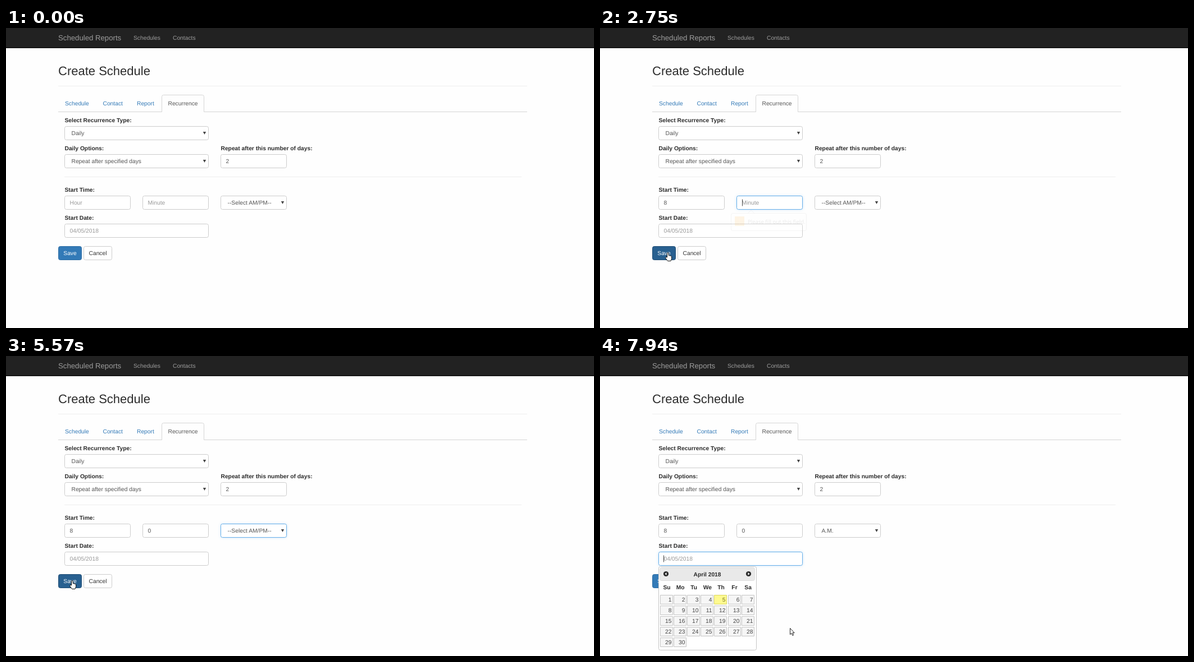
Write an HTML page with a canvas that moves like this. It is 1047x535 px and loops after 8000 ms.

```html
<!DOCTYPE html>
<html lang="en">
<head>
<meta charset="utf-8">
<title>Create Schedule</title>
<style>
html, body { margin: 0; width: 100%; height: 100%; overflow: hidden; background: #fefefe; }
canvas { display: block; }
</style>
</head>
<body>
<canvas id="stage" width="1047" height="535"></canvas>
<script>
const ctx = document.getElementById('stage').getContext('2d');
ctx.textRendering = 'geometricPrecision';
const LOOP = 8000, SIZE = 10.27, FIELD_H = 25;
const SANS = '"Liberation Sans", Arial, sans-serif';
const BUBBLE_FONT = '"Open Sans", "Noto Sans", sans-serif';

// The form grid: three columns, one y per row of fields
const COL = [104, 243, 382], WIDE = 257, NARROW = 118;
const TYPE_Y = 175, DAILY_Y = 225, TIME_Y = 299, DATE_Y = 349, BUTTON_Y = 389;

const ramp = (t, from, to) => Math.min(1, Math.max(0, (t - from) / (to - from)));
const ease = u => u * u * (3 - 2 * u);
const during = (t, from, to) => t >= from && t < to;
const over = (p, x, y, w) => p && p.x >= x && p.x <= x + w && p.y >= y && p.y <= y + FIELD_H;

// Each move curves from the last place to (x, y); bend pushes the arc sideways
const move = (from, to, x, y, bend = 0) => ({ from, to, x, y, bend });
const MOVES = [
  move(310, 920, 186, 321),
  move(1470, 1630, 207, 337),
  move(1630, 2070, 136, 402, .8),
  move(2220, 2250, 121, 401),
  move(3310, 4100, 401, 310, .15),
  move(4330, 4590, 507, 327),
  move(4780, 4930, 83, 454),
  move(4930, 5350, 118, 401, .5),
  move(5630, 6120, 457, 339, -.7),
  move(6200, 6420, 457, 318),
  move(6850, 7040, 465, 326),
  move(7040, 7170, 464, 344),
  move(7670, 7790, 340, 366),
  move(7790, 7930, 338, 485)
];

function pointerAt(t) {
  if (t < MOVES[0].from) return null;
  let x = 239, y = 500;
  for (const m of MOVES) {
    if (t < m.from) break;
    const u = ease(ramp(t, m.from, m.to)), dx = m.x - x, dy = m.y - y;
    const bow = 2 * u * (1 - u) * m.bend;
    x += dx * u + dy * bow;
    y += dy * u - dx * bow;
  }
  return { x: Math.round(x), y: Math.round(y) };
}

// y is the middle of the capitals
function text(str, x, y, color = '#555', { size = SIZE, weight = '', align = 'left', font = SANS } = {}) {
  ctx.font = `${weight} ${size}px ${font}`;
  ctx.textAlign = align;
  ctx.fillStyle = color;
  ctx.fillText(str, x, Math.round(y + size * 0.36));
}
const bold = (str, x, y, align) => text(str, x, y, '#2b2b2b', { weight: 'bold', align });
const label = (str, x, fieldY) => bold(str, x + .5, fieldY - 10.8);

function rect(x, y, w, h, color) {
  ctx.fillStyle = color;
  ctx.fillRect(x, y, w, h);
}

function box(x, y, w, h, fill, stroke, radius = 3) {
  ctx.beginPath();
  ctx.roundRect(x + .5, y + .5, w - 1, h - 1, radius);
  ctx.fillStyle = fill;
  ctx.fill();
  ctx.shadowColor = 'transparent';
  ctx.strokeStyle = stroke;
  ctx.lineWidth = 1;
  ctx.stroke();
}

function polygon(points, fill, stroke) {
  ctx.beginPath();
  points.forEach(([x, y]) => ctx.lineTo(x, y));
  ctx.closePath();
  ctx.fillStyle = fill;
  ctx.fill();
  if (stroke) { ctx.strokeStyle = stroke; ctx.lineWidth = 1; ctx.stroke(); }
}

function field(x, y, w, focused) {
  ctx.save();
  if (focused) {
    ctx.shadowColor = 'rgba(102,175,233,.4)';
    ctx.shadowBlur = 5;
  }
  box(x, y, w, FIELD_H, '#fff', focused ? '#66afe9' : '#ccc');
  ctx.restore();
}

function input(x, y, w, value, hint, focused) {
  field(x, y, w, focused);
  text(value || hint, x + 9.5, y + 12.5, value ? '#555' : '#999');
}

function select(x, y, w, value, focused) {
  field(x, y, w, focused);
  text(value, x + 12.5, y + 12.5);
  const ax = x + w - 7.5, ay = y + 10;
  polygon([[ax - 2.7, ay], [ax + 2.7, ay], [ax, ay + 5]], '#444');
}

function caret(t, since, x, y) {
  if ((t - since) % 1000 < 500) rect(x, y + 6.5, 1, 12, '#444');
}

function button(name, x, w, fill, stroke, color) {
  box(x, BUTTON_Y, w, FIELD_H, fill, stroke);
  text(name, x + w / 2, BUTTON_Y + 12.5, color, { align: 'center' });
}

function bubble(message, x, w, alpha) {
  if (alpha <= 0) return;
  ctx.save();
  ctx.globalAlpha = alpha;
  // The shadow shows through a half-clear box, so it fades in later
  ctx.shadowColor = `rgba(0,0,0,${.4 * alpha * alpha})`;
  ctx.shadowBlur = 4;
  ctx.shadowOffsetX = ctx.shadowOffsetY = 2;
  box(x, 330, w, 32, '#fff', '#999');
  polygon([[x + 30.5, 331], [x + 36, 324.5], [x + 41.5, 331]], '#fff');
  ctx.beginPath();
  ctx.moveTo(x + 30.5, 330.5);
  ctx.lineTo(x + 36, 324.5);
  ctx.lineTo(x + 41.5, 330.5);
  ctx.stroke();
  rect(x + 7, 336, 17, 17, '#ff9c0a');
  rect(x + 14.5, 339, 2, 7, '#fff');
  rect(x + 14.5, 348, 2, 2, '#fff');
  text(message, x + 30, 346, '#333', { size: 9.6, font: BUBBLE_FONT });
  ctx.restore();
}

function options(pointer) {
  const x = COL[2], y = TIME_Y + FIELD_H, step = 13.3;
  box(x, y - 1, NARROW, 42, '#fff', '#6f9bd8', 0);
  const active = pointer.y >= y + step ? 1 : 0;
  ['--Select AM/PM--', 'A.M.', 'P.M'].forEach((name, i) => {
    const top = y + i * step;
    if (i === active) rect(x + 1, Math.round(top), NARROW - 2, 14, '#1e90ff');
    text(name, x + 12.5, top + 6.5, i === active ? '#fff' : '#555');
  });
}

function calendar() {
  const left = 107, pitch = 24.1;
  box(104, 375, 175, 150, '#fff', '#c5c5c5');
  box(106, 377, 170, 24, '#e9e9e9', '#ddd');
  bold('April 2018', 191, 389, 'center');
  for (const [x, dir] of [[117.5, -1], [264.5, 1]]) {
    ctx.beginPath();
    ctx.arc(x, 388.5, 4.6, 0, 7);
    ctx.fillStyle = '#2b2b2b';
    ctx.fill();
    polygon([[x + dir * 2, 388.5], [x - dir, 386], [x - dir, 391]], '#fff');
  }
  ['Su', 'Mo', 'Tu', 'We', 'Th', 'Fr', 'Sa'].forEach((d, i) => bold(d, left + 12 + i * pitch, 412, 'center'));
  for (let day = 1; day <= 30; day++) {
    const x = Math.round(left + (day - 1) % 7 * pitch), y = 426 + Math.floor((day - 1) / 7) * 19;
    const today = day === 5;
    box(x, y, 23, 17, today ? '#fffa90' : '#f6f6f6', today ? '#dad55e' : '#c5c5c5', 0);
    text(day, x + 20.5, y + 8.5, today ? '#777620' : '#454545', { align: 'right' });
  }
}

function drawPointer(p, kind) {
  ctx.save();
  ctx.translate(p.x, p.y);
  if (kind === 'text') {
    rect(-2, -7, 6, 1, '#333');
    rect(0, -7, 1, 14, '#333');
    rect(-2, 6, 6, 1, '#333');
  } else if (kind === 'hand') {
    polygon([[-1.5, 8], [-1.5, .5], [0, -.5], [1.2, .5], [1.2, 4.5], [5, 5.3],
      [6.5, 6.5], [6.5, 10.5], [5, 14.5], [-.5, 14.5], [-4.5, 9], [-3.5, 7.3]], '#fff', '#111');
  } else {
    polygon([[.5, .5], [.5, 11.7], [3, 9.4], [4.9, 13.5], [6.7, 12.7], [4.9, 8.7], [8.2, 8.7]], '#fff', '#222');
  }
  ctx.restore();
}

function page() {
  rect(0, 0, 1047, 535, '#fefefe');
  rect(0, 0, 1047, 36, '#222');
  rect(0, 34, 1047, 2, '#141414');
  text('Scheduled Reports', 93, 17, '#9d9d9d', { size: 13.2 });
  text('Schedules', 227, 17, '#9d9d9d');
  text('Contacts', 297, 17, '#9d9d9d');
  text('Create Schedule', 93, 76.5, '#2b2b2b', { size: 22 });
  rect(93, 103, 835, 1, '#eee');
  rect(93, 149, 835, 1, '#d5d5d5');
  box(277, 119, 76, 34, '#fefefe', '#d5d5d5');
  rect(276, 150, 78, 4, '#fefefe');
  text('Schedule', 105, 134, '#337ab7');
  text('Contact', 172.5, 134, '#337ab7');
  text('Report', 233, 134, '#337ab7');
  text('Recurrence', 288.5, 134);
  rect(104, 265, 814, 1, '#eee');
  label('Select Recurrence Type:', COL[0], TYPE_Y);
  label('Daily Options:', COL[0], DAILY_Y);
  label('Repeat after this number of days:', COL[2], DAILY_Y);
  label('Start Time:', COL[0], TIME_Y);
  label('Start Date:', COL[0], DATE_Y);
  select(COL[0], TYPE_Y, WIDE, 'Daily');
  select(COL[0], DAILY_Y, WIDE, 'Repeat after specified days');
  input(COL[2], DAILY_Y, NARROW, '2');
}

function draw(t) {
  const pointer = pointerAt(t);
  const onSave = over(pointer, 93, BUTTON_Y, 42), onCancel = over(pointer, 138, BUTTON_Y, 51);
  const onInput = over(pointer, COL[0], TIME_Y, NARROW) || over(pointer, COL[1], TIME_Y, NARROW) ||
    over(pointer, COL[0], DATE_Y, WIDE);
  const pressed = during(t, 2460, 2580) || during(t, 5440, 5540);
  const hourFocus = during(t, 1190, 2460), minuteFocus = during(t, 2600, 5450);
  const halfFocus = during(t, 5550, 7800), dateFocus = t >= 7800;
  const hourTyped = 1450, minuteTyped = 3900, chosen = 7200;

  page();
  input(COL[0], TIME_Y, NARROW, t >= hourTyped && '8', 'Hour', hourFocus);
  input(COL[1], TIME_Y, NARROW, t >= minuteTyped && '0', 'Minute', minuteFocus);
  select(COL[2], TIME_Y, NARROW, t >= chosen ? 'A.M.' : '--Select AM/PM--', halfFocus);
  input(COL[0], DATE_Y, WIDE, '', '04/05/2018', dateFocus);

  if (hourFocus) t < hourTyped ? caret(t, 1190, 113, TIME_Y) : caret(t, hourTyped, 119, TIME_Y);
  if (minuteFocus) t < minuteTyped ? caret(t, 2600, 253, TIME_Y) : caret(t, minuteTyped, 258, TIME_Y);
  if (dateFocus) caret(t, 7800, 113, DATE_Y);

  const saveFill = pressed ? '#204d74' : onSave ? '#286090' : '#337ab7';
  button('Save', 93, 42, saveFill, onSave ? '#204d74' : '#2e6da4', '#fff');
  button('Cancel', 138, 51, onCancel ? '#e6e6e6' : '#fff', onCancel ? '#adadad' : '#ccc', '#333');

  bubble('Please fill out this field.', 233, 135, ramp(t, 2700, 3200) - ramp(t, minuteTyped, 4090));
  bubble('Please select an item in the list.', 352, 177, ramp(t, 5640, 6060) - ramp(t, 6480, 6600));
  if (during(t, 6620, chosen)) options(pointer);
  if (dateFocus) calendar();
  if (pointer) drawPointer(pointer, onInput ? 'text' : onSave || onCancel ? 'hand' : 'arrow');
}

const start = performance.now();
function tick() {
  draw((performance.now() - start) % LOOP);
  requestAnimationFrame(tick);
}
tick();
</script>
</body>
</html>
```
